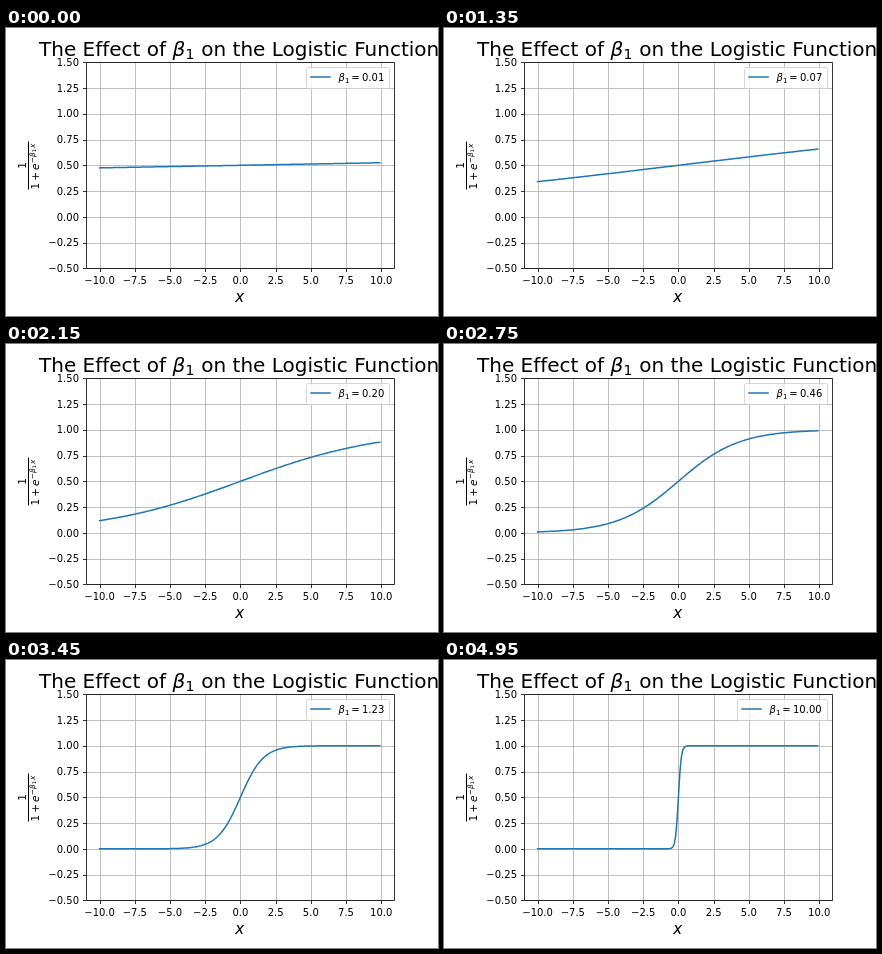
An HTML page that plays this animation: 432x288 px, repeating every 5000 ms.

```html
<!DOCTYPE html>
<html lang="en">
<head>
<meta charset="utf-8">
<title>Logistic function</title>
<style>
  html, body { margin: 0; width: 100%; height: 100%; overflow: hidden; background: #fff; }
  svg { display: block; font: 10px "DejaVu Sans", sans-serif; font-variant-ligatures: none; }
  path, line { fill: none; stroke-width: .8; }
  .grid { stroke: #b0b0b0; }
  .axis { stroke: #000; }
  .curve { stroke: #1f77b4; stroke-width: 1.5; stroke-linecap: square; stroke-linejoin: round; }
  .italic { font-style: oblique; }
  .title { font-size: 20px; }
</style>
</head>
<body>
<svg width="432" height="288" viewBox="0 0 432 288">
  <path id="grid" class="grid"/>
  <path id="curve" class="curve"/>
  <path id="axes" class="axis"/>
  <g id="ticks"></g>

  <g class="title">
    <text x="33" y="28">The Effect of</text>
    <text x="166.5" y="28" class="italic">β</text>
    <text x="179.6" y="31" font-size="14">1</text>
    <text x="195.3" y="28">on the Logistic Function</text>
  </g>
  <text x="229.2" y="274" font-size="15" class="italic">x</text>

  <g transform="translate(0 161.5) rotate(-90)" font-size="10.5">
    <text x="20.7" y="20">1</text>
    <line x2="48" y1="22.5" y2="22.5" class="axis" style="stroke-width:1"/>
    <text x="0" y="33">1</text>
    <text x="8.7" y="33">+</text>
    <text x="19.5" y="33" class="italic">e</text>
    <g font-size="7.35">
      <text x="26.2" y="29">−</text>
      <text x="32.4" y="29" class="italic">β</text>
      <text x="37.3" y="30.3" font-size="5.15">1</text>
      <text x="41.6" y="29" class="italic">x</text>
    </g>
  </g>

  <rect id="frame" y="39.5" height="21" rx="2" fill="#fff" fill-opacity=".8" stroke="#ccc" stroke-opacity=".8"/>
  <g id="legend">
    <path d="M4.5 49H23.5" class="curve"/>
    <text x="32" y="53" class="italic">β</text>
    <text x="38.5" y="54.6" font-size="7">1</text>
    <text x="44.8" y="53">=</text>
    <text id="value" x="55.5" y="53"></text>
  </g>
</svg>
<script>
const $ = id => document.getElementById(id);
const LEFT = 79.6, RIGHT = 387.8, TOP = 34.2, BOTTOM = 240.4;
const px = x => LEFT + (x + 10.995) / 21.89 * (RIGHT - LEFT);
const py = y => BOTTOM - (y + 0.5) / 2 * (BOTTOM - TOP);
const snap = v => Math.round(v) + 0.5;
const [l, r, t, b] = [LEFT, RIGHT, TOP, BOTTOM].map(snap);

let grid = '', axes = `M${l} ${t}H${r}V${b}H${l}Z`, labels = '';
const label = (x, y, anchor, text) =>
  labels += `<text x="${x}" y="${y}" text-anchor="${anchor}">${text.replace('-', '−')}</text>`;

for (let i = 0; i <= 8; i++) {
  const xv = -10 + 2.5 * i, yv = -0.5 + 0.25 * i;
  const x = snap(px(xv)), y = snap(py(yv));
  grid += `M${x} ${t}V${b}M${l} ${y}H${r}`;
  axes += `M${x} ${b}v3.5M${l} ${y}h-3.5`;
  label(px(xv), 256, 'middle', xv.toFixed(1));
  label(73, Math.round(py(yv) + 3.7), 'end', yv.toFixed(2));
}
$('grid').setAttribute('d', grid);
$('axes').setAttribute('d', axes);
$('ticks').innerHTML = labels;

const STEPS = 100, STEP_MS = 50;
let shown = -1;

function draw(step) {
  const beta = 10 ** (-2 + 3 * step / (STEPS - 1));
  const points = Array.from({ length: 200 }, (_, i) => {
    const x = -10 + i / 10;
    return `${px(x).toFixed(2)} ${py(1 / (1 + Math.exp(-beta * x))).toFixed(2)}`;
  });
  $('curve').setAttribute('d', 'M' + points.join('L'));

  const text = beta.toFixed(2);
  const left = text.length > 4 ? 293.5 : 300.5;
  $('value').textContent = text;
  $('legend').setAttribute('transform', `translate(${left})`);
  $('frame').setAttribute('x', left);
  $('frame').setAttribute('width', 383.5 - left);
}

function tick() {
  const step = Math.floor(performance.now() / STEP_MS) % STEPS;
  if (step !== shown) draw(shown = step);
  requestAnimationFrame(tick);
}
tick();
</script>
</body>
</html>
```
